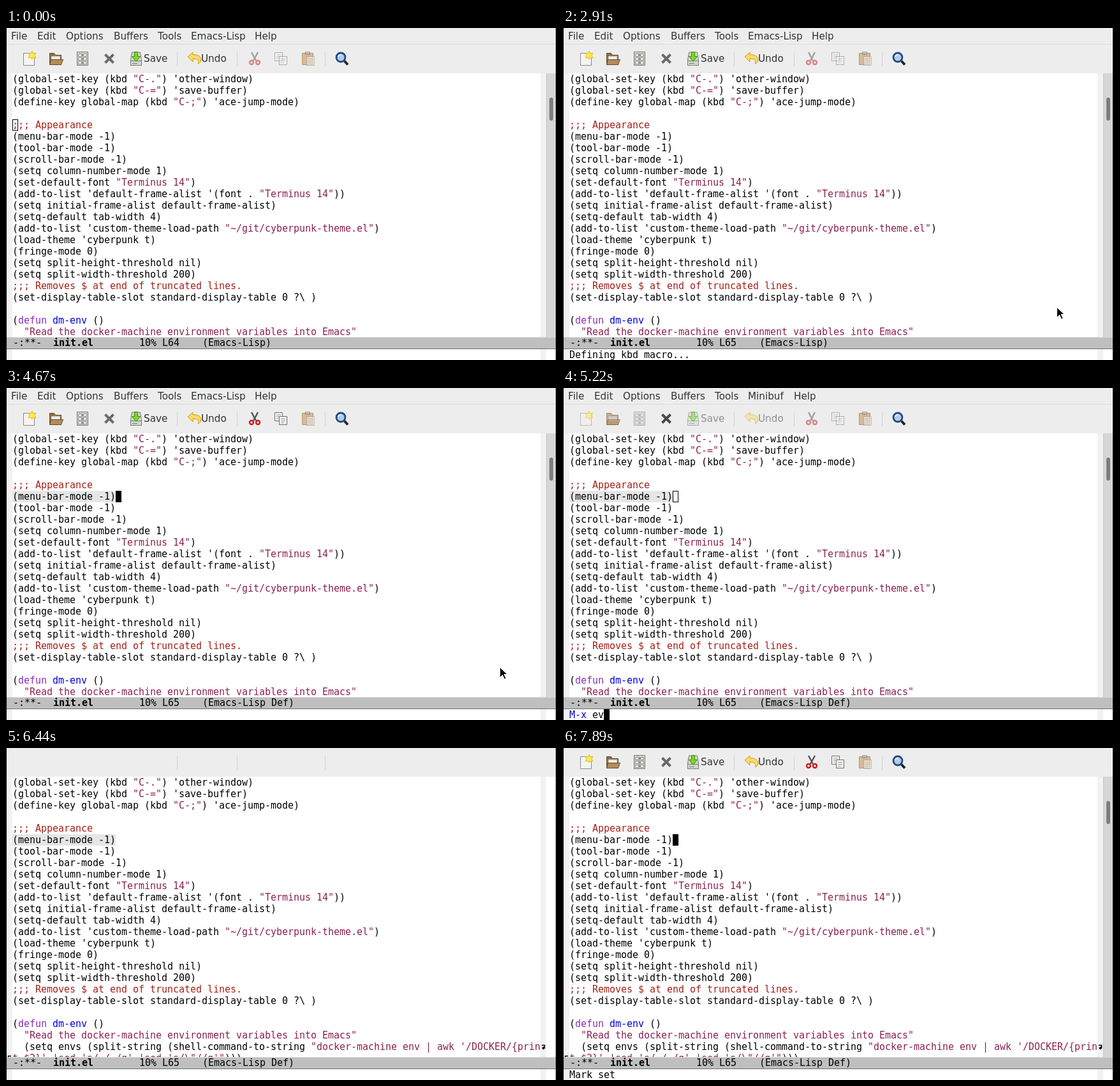
An HTML page with a canvas for the animation above (8000 ms loop, 864 by 520 pixels).

```html
<!DOCTYPE html>
<html lang="en">
<head>
<meta charset="utf-8">
<title>Editor session</title>
<style>
  html, body { margin: 0; width: 100%; height: 100%; overflow: hidden; background: #fff; }
  canvas { display: block; }
</style>
</head>
<body>
<canvas id="stage" width="864" height="520"></canvas>
<script>
const ctx = document.getElementById('stage').getContext('2d');
const LOOP = 8000, CELL = 9, LINE = 18, LEFT = 10, COLS = 92;
const MONO = '15px "DejaVu Sans Mono", monospace';
const SANS = '15.2px "DejaVu Sans", sans-serif';

const code = String.raw`(global-set-key (kbd "C-.") 'other-window)
(global-set-key (kbd "C-=") 'save-buffer)
(define-key global-map (kbd "C-;") 'ace-jump-mode)

;;; Appearance
(menu-bar-mode -1)
(tool-bar-mode -1)
(scroll-bar-mode -1)
(setq column-number-mode 1)
(set-default-font "Terminus 14")
(add-to-list 'default-frame-alist '(font . "Terminus 14"))
(setq initial-frame-alist default-frame-alist)
(setq-default tab-width 4)
(add-to-list 'custom-theme-load-path "~/git/cyberpunk-theme.el")
(load-theme 'cyberpunk t)
(fringe-mode 0)
(setq split-height-threshold nil)
(setq split-width-threshold 200)
;;; Removes $ at end of truncated lines.
(set-display-table-slot standard-display-table 0 ?\ )

(defun dm-env ()
  "Read the docker-machine environment variables into Emacs"
  (setq envs (split-string (shell-command-to-string "docker-machine env | awk '/DOCKER/{print $2}' |sed 's/=/ /g' |sed 's/\"//g'")))`.split('\n');

const syntax = /(;;;.*)|("(?:\\.|[^"\\])*")|(defun)|(dm-env)/g;
const syntaxColors = ['#a52018', '#8b2252', '#8a2bc0', '#0000e0'];

// Timelines: [start, value...]; the latest started entry applies.
const cursorSteps = [
  [0, 'hollow', 0, 4], [480, 'solid', 0, 4], [970, 'off'], [1460, 'solid', 0, 4],
  [1960, 'off'], [2000, 'solid', 0, 5], [2490, 'off'], [2950, 'solid', 0, 5],
  [3400, 'off'], [3440, 'solid', 0, 5], [3690, 'solid', 18, 5], [4220, 'off'],
  [4670, 'solid', 18, 5], [4750, 'hollow', 18, 5], [6440, 'off'],
  [6480, 'solid', 18, 5], [6970, 'off'], [7420, 'solid', 18, 5]
];
const echoSteps = [
  [0, ''], [2910, 'Defining kbd macro...'], [3440, 'Mark set'], [3730, ''], [7850, 'Mark set']
];
const typedSteps = [
  [0, 0], [5000, 1], [5140, 2], [5240, 3], [5340, 4], [5560, 5],
  [5630, 6], [5700, 7], [5870, 9], [5990, 11]
];
const latest = (steps, t) => steps.findLast(step => step[0] <= t);
const during = (t, from, to) => t >= from && t < to;

function rect(x, y, w, h, color) {
  ctx.fillStyle = color;
  ctx.fillRect(x, y, w, h);
}

function label(text, x, y, color) {
  ctx.font = SANS;
  ctx.fillStyle = color;
  ctx.fillText(text, x, y);
}

// Monospaced text on the character grid.
function cells(text, x, top, color = '#000', weight = '') {
  ctx.font = weight + MONO;
  ctx.fillStyle = color;
  [...text].forEach((ch, i) => ctx.fillText(ch, x + i * CELL, top + 14));
}

function shape(d, fill, stroke, width = 1) {
  const path = new Path2D(d);
  if (fill) { ctx.fillStyle = fill; ctx.fill(path); }
  if (stroke) { ctx.strokeStyle = stroke; ctx.lineWidth = width; ctx.stroke(path); }
}

const icons = {
  create: [24, [
    ['M3.5 3.5h17v19h-17z', '#f4f4f2', '#888a85'],
    ['M17 0l2 4 4-1-2 4 2 4-4-1-2 3-2-3-4 1 2-4-2-4 4 1z', '#fce94f', '#e3bd1c']]],
  open: [66, [
    ['M2.5 21.5v-18h7l2 3h9v15z', '#8f6a40', '#6b4a22'],
    ['M5 8h14v8h-14z', '#eeeeec', '#999'],
    ['M4.5 13.5h19l-3 8h-18z', '#b58b5a', '#6b4a22']]],
  cabinet: [108, [
    ['M3.5 1.5h17v21h-17z', '#d3d7cf', '#777a75'],
    ['M5.5 4.5h13v4h-13zM5.5 10.5h13v4h-13zM5.5 16.5h13v4h-13z', '#eeeeec', '#8c8f8a'],
    ['M10 6.5h4M10 12.5h4M10 18.5h4', null, '#555', 1.5]]],
  close: [150, [['M5.5 5.5l13 13M18.5 5.5l-13 13', null, '#484a47', 4]]],
  save: [192, [
    ['M3.5 14l2-12h13l2 12v8.5h-17z', '#d3d7cf', '#777a75'],
    ['M4 15.5h16M6 19.5h8', null, '#777a75'],
    ['M9.5 1.5h5v7h4l-6.5 8-6.5-8h4z', '#7ad827', '#3f8a06']]],
  undo: [284, [
    ['M1 9l8-7v4c8-1 13 3 13 8 0 3-2 5-5 6 2-4 1-8-8-8v5z', '#fbd968', '#c9a01c']]],
  cut: [378, [
    ['M7 2l7 13M17 2l-7 13', null, '#555753', 2.5],
    ['M4 18a3 3 0 1 0 6 0a3 3 0 1 0-6 0M14 18a3 3 0 1 0 6 0a3 3 0 1 0-6 0', null, '#cc1c1c', 2.4]]],
  copy: [420, [
    ['M1.5 2.5h12v13h-12z', '#f4f4f2', '#6c6f69'],
    ['M4 6h7M4 9h7M4 12h3', null, '#999'],
    ['M8.5 8.5h12v13h-12z', '#f4f4f2', '#6c6f69'],
    ['M11 12.5h7M11 15.5h7M11 18.5h5', null, '#999']]],
  paste: [462, [
    ['M2.5 3.5h17v18h-17z', '#c48a48', '#8f5902'],
    ['M7.5 1.5h7v4h-7z', '#b5b8b2', '#666'],
    ['M9.5 8.5h12v14h-12z', '#f4f4f2', '#888a85'],
    ['M12 12.5h7M12 15.5h7M12 18.5h5', null, '#aaa']]],
  search: [515, [
    ['M15.5 15.5l5.5 6', null, '#23272a', 4],
    ['M3 10a7 7 0 1 0 14 0a7 7 0 1 0-14 0', '#b4cbe6', '#204a87', 2.8],
    ['M6 9a4.5 4.5 0 0 1 5-3.5', null, '#fff', 1.5]]]
};

function drawIcon(name, top, alpha) {
  const [x, shapes] = icons[name];
  ctx.save();
  ctx.translate(x, top);
  ctx.globalAlpha = alpha;
  shapes.forEach(args => shape(...args));
  ctx.restore();
}

function drawMenu(minibuffer) {
  const items = [['File', 9], ['Edit', 50], ['Options', 95], ['Buffers', 170], ['Tools', 239],
    [minibuffer ? 'Minibuf' : 'Emacs-Lisp', 291], ['Help', minibuffer ? 363 : 391]];
  items.forEach(([text, x]) => label(text, x - 1, 18, '#2e3436'));
  rect(1, 25, 861, 1, '#dcdcdc');
}

function drawToolbar(t, top, minibuffer) {
  for (const x of [268, 362, 500]) rect(x, top + 12, 1, 22, '#d2d2d2');
  if (during(t, 6440, 6480)) return;
  const main = minibuffer ? 0.5 : 1;
  const region = t >= 3480 && !minibuffer ? 1 : 0.5;
  const alphas = { create: main, open: main, cabinet: main, close: minibuffer ? 1 : 0.8,
    save: main, undo: main, cut: region, copy: region, paste: 0.5, search: 1 };
  for (const name in alphas) drawIcon(name, top + 10, alphas[name]);
  const color = minibuffer ? '#8e9192' : '#2e3436';
  label('Save', 216, top + 27, color);
  label('Undo', 306, top + 27, color);
}

function drawCode(top) {
  let row = 0;
  for (const line of code) {
    const colors = Array(line.length).fill('#000');
    for (const m of line.matchAll(syntax)) {
      const kind = m.slice(1).findIndex(Boolean);
      colors.fill(syntaxColors[kind], m.index, m.index + m[0].length);
    }
    [...line].forEach((ch, i) => {
      const wrapped = Math.floor(i / COLS);
      cells(ch, LEFT + i % COLS * CELL, top + (row + wrapped) * LINE, colors[i]);
    });
    row++;
  }
  // Line-wrap marks in the fringes.
  const y = top + 23 * LINE;
  shape(`M840 ${y + 6.5}h4.5v4.5h-3`, null, '#000', 1.6);
  shape(`M840 ${y + 11}l3.5-3v6z`, '#000');
  shape(`M8 ${y + 23.5}h-4.5v5h3`, null, '#000', 1.6);
}

function drawCursor([, kind, col, row], top) {
  if (kind === 'off') return;
  const x = LEFT + col * CELL, y = top + row * LINE;
  if (kind === 'hollow') {
    ctx.strokeStyle = '#000';
    ctx.lineWidth = 1;
    ctx.strokeRect(x + 0.5, y + 0.5, CELL - 1, LINE - 1);
  } else {
    rect(x, y, CELL, LINE, '#000');
    cells(code[row][col] || '', x, y, '#fff');
  }
}

function drawScrollbar(top) {
  rect(847, top, 15, 485 - top, '#d6d6d6');
  rect(847, top, 1, 485 - top, '#c4c4c4');
  ctx.fillStyle = '#7c7e7f';
  ctx.beginPath();
  ctx.roundRect(852, top + 38, 6, 36, 3);
  ctx.fill();
}

function drawModeLine(t) {
  rect(1, 484, 861, 19, '#bfbfbf');
  rect(1, 484, 861, 1, '#d8d8d8');
  rect(1, 502, 861, 1, '#6e6e6e');
  const line = t < 2040 ? 64 : 65;
  const mode = t < 2950 ? '(Emacs-Lisp)' : '(Emacs-Lisp Def)';
  cells('-:**-', 11, 484);
  cells('init.el', 74, 484, '#000', 'bold ');
  cells(`10% L${line}    ${mode}`, 209, 484);
}

function drawEcho(t) {
  const top = 503;
  if (!during(t, 4750, 6440)) return cells(latest(echoSteps, t)[1], LEFT, top);
  const typed = 'eval-region'.slice(0, latest(typedSteps, t)[1]);
  cells('M-x', LEFT, top, '#0000cd');
  cells(typed, LEFT + 4 * CELL, top);
  rect(LEFT + (4 + typed.length) * CELL, top, CELL, LINE, '#000');
}

function drawPointer(t) {
  if (!during(t, 480, 5000)) return;
  const left = (1 - Math.min(1, (t - 480) / 440)) ** 2;
  ctx.save();
  ctx.translate(774 + 16 * left, 437 + 76 * left);
  shape('M.5.5v16l4-4 3 6.5 2.6-1.2-3-6.3h5z', '#000', '#fff');
  ctx.restore();
}

function draw(t) {
  const hasMenu = t < 6440;
  const toolbarTop = hasMenu ? 26 : 0;
  const top = toolbarTop + 45;
  const minibuffer = during(t, 4790, 6440);

  rect(0, 0, 864, 520, '#fff');
  rect(1, 0, 861, top, '#ededed');
  rect(2, top, 8, 520 - top, '#f2f2f2');
  rect(838, top, 9, 520 - top, '#f2f2f2');
  if (hasMenu) drawMenu(minibuffer);
  drawToolbar(t, toolbarTop, minibuffer);
  if (during(t, 3690, 7890)) rect(LEFT, top + 5 * LINE, 18 * CELL, LINE, '#e6e6e6');
  drawCode(top);
  drawCursor(latest(cursorSteps, t), top);
  if (!during(t, 6440, 6480)) drawScrollbar(top);
  drawModeLine(t);
  rect(1, 503, 861, 17, '#fff');
  rect(2, 503, 8, 17, '#f2f2f2');
  rect(838, 503, 9, 17, '#f2f2f2');
  drawEcho(t);
  drawPointer(t);
  rect(0, 0, 1, 520, '#000');
  rect(862, 0, 2, 520, '#000');
}

const start = performance.now();
function tick() {
  draw((performance.now() - start) % LOOP);
  requestAnimationFrame(tick);
}
tick();
</script>
</body>
</html>
```
